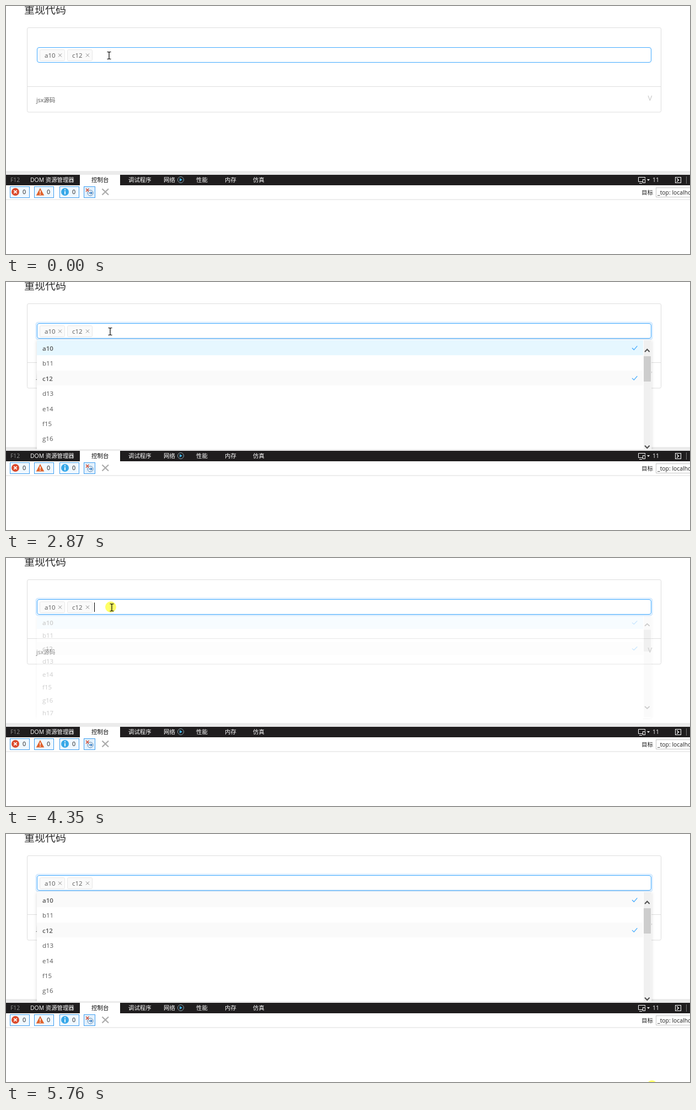
Animation of 1241x451 px, one loop 5800 ms. Source, as an HTML page:

```html
<!DOCTYPE html>
<html lang="zh">
<head>
<meta charset="utf-8">
<title>Select demo</title>
<style>
  html, body { margin: 0; width: 100%; height: 100%; overflow: hidden; background: #fff; }
  svg { display: block; }
  text { font-family: "Open Sans", "Noto Sans CJK SC", "Noto Sans CJK", sans-serif; white-space: pre; }
</style>
</head>
<body>
<svg id="stage" width="1241" height="451" viewBox="0 0 1241 451"></svg>
<script>
const LOOP = 5800;
const ROW_TOP = 106, ROW_HEIGHT = 27.43;
const ROWS = ['a10', 'b11', 'c12', 'd13', 'e14', 'f15', 'g16', 'h17'];
const SELECTED = ['a10', 'c12'];

const label = (x, y, s, size = 10.4, fill = '#fff', extra = '') =>
  `<text x="${x}" y="${y}" font-size="${size}" fill="${fill}" ${extra}>${s}</text>`;
const box = (x, y, w, h, fill, extra = '') =>
  `<rect x="${x}" y="${y}" width="${w}" height="${h}" fill="${fill}" ${extra}/>`;
const line = (d, stroke, width = 1, extra = '') =>
  `<path d="${d}" fill="none" stroke="${stroke}" stroke-width="${width}" ${extra}/>`;

const tag = (x, s) =>
  box(x + .5, 79.5, 45, 20, '#fafafa', 'stroke="#e8e8e8" rx="2"') +
  label(x + 9, 94, s, 11.5, '#595959') +
  line(`M${x + 34} 86.5l6 6m0 -6l-6 6`, '#8c8c8c');

const page = () =>
  label(33, 14.3, '重现代码', 19, '#2b2b2b') +
  box(38.5, 39.5, 1150, 153.5, '#fff', 'stroke="#dedede" rx="2.5"') +
  line('M38 146.5H1188', '#dedede') +
  label(55, 174.5, 'jsx源码', 10.5, '#595959') +
  label(1164.5, 172, 'V', 13, '#c4c4c4') +
  box(0, 300, 1241, 7, '#ebebeb') +
  box(54.5, 73.5, 1118, 31, 'none', 'id="glow" rx="4" stroke="#d1e9ff" stroke-width="2"') +
  box(56.5, 75.5, 1114, 27, '#fff', 'id="field" rx="3.5"') +
  tag(61, 'a10') + tag(111, 'c12') +
  box(160, 81, 1, 17, '#000', 'id="caret"');

const row = (name, i) => {
  const y = ROW_TOP + i * ROW_HEIGHT;
  const on = SELECTED.includes(name);
  return box(56, y, 1100, ROW_HEIGHT, '#fff', 'class="row"') +
    label(66, y + 18.8, name, 11.5, '#595959', on ? 'font-weight="600"' : '') +
    (on ? line(`M1136 ${y + 14}l3.3 3.3 6 -7`, '#40a9ff', 1.3) : '');
};

const dropdown = () =>
  `<g clip-path="url(#view)"><g id="menu">` +
  box(56, 105, 1115, 217, '#fff', 'rx="3" style="filter:drop-shadow(0 1px 3px rgba(0,0,0,.15))"') +
  ROWS.map(row).join('') +
  box(1157, 106, 13.5, 214, '#f0f0f0') + box(1157, 135, 13, 46, '#cdcdcd') +
  line('M1159 127l4.3 -4.5 4.3 4.5M1159 297.5l4.3 4.5 4.3 -4.5', '#505050', 2) +
  `</g></g>`;

const counter = (x, icon) =>
  box(x + .5, 328.5, 35, 20, '#f0f8ff', 'stroke="#3c9df0"') + icon + label(x + 23, 342, '0', 10.8, '#1e1e1e');

const devtools = () =>
  box(0, 307, 1241, 19, '#1f1d1e') + box(134, 307, 73, 19, '#fff') +
  label(8, 320, 'F12', 10.4, '#8c8c8c') + label(155, 320, '控制台', 10.5, '#000') +
  [[44, 'DOM 资源管理器'], [222, '调试程序'], [286, '网络'], [345, '性能'], [397, '内存'], [448, '仿真'], [1173, '11']]
    .map(([x, s]) => label(x, 320, s, 10.4)).join('') +
  '<circle cx="317" cy="316" r="5.5" fill="#1f1d1e" stroke="#8aa0a8"/><path d="M315 313l5 3-5 3z" fill="#3fb4f0"/>' +
  line('M1155 319.5H1147.5V311.5H1159.5V314M1149 322.5H1154', '#fff') +
  box(1155.5, 315.5, 4, 6, '#1f1d1e', 'stroke="#fff"') + '<path d="M1163 315h5l-2.5 3z" fill="#fff"/>' +
  box(1214.5, 311.5, 10, 10, 'none', 'stroke="#fff"') + line('M1217 313.5l3.5 3-3.5 3', '#fff', 1.3) +
  line('M1234.5 310V323', '#777') +
  counter(7, '<circle cx="17" cy="338" r="7" fill="#dc4a2c"/>' + line('M14.3 335.3l5.4 5.4m0 -5.4l-5.4 5.4', '#fff', 1.8)) +
  counter(51, '<path d="M62 331l7.3 13.5H54.7z" fill="#e0622c"/>' + line('M62 335.5V340M62 341.3V343', '#fff', 1.6)) +
  counter(97, '<circle cx="107" cy="338" r="7" fill="#38a8e8"/>' + line('M107 333.3V335.2M107 336.7V342.5', '#fff', 1.8)) +
  box(141.5, 328.5, 20, 20, '#e3f1fd', 'stroke="#3c9df0"') +
  '<circle cx="153" cy="340" r="5" fill="#fff" stroke="#4f7fae"/>' +
  line('M150 340h6m-2.5 -2.5l2.5 2.5 -2.5 2.5', '#2f78c0', 1.3) + line('M145 332l5.5 5.5m0 -5.5l-5.5 5.5', '#d2452d', 1.4) +
  line('M174.5 332.5l11.5 11m0 -11l-11.5 11', '#ababab', 2.2) +
  label(1153, 343, '目标', 10.5, '#1e1e1e') +
  box(1179.5, 330.5, 70, 17, '#fff', 'stroke="#c8c8c8"') + label(1182, 343, '_top: localhost', 10.4, '#1e1e1e') +
  line('M0 352H1241', '#dcdcdc');

const pointer = () =>
  '<circle id="click" r="10" fill="#ffff66"/><g id="pointer">' +
  `<g id="beam">${line('M-1.5 -5.5H1L2 -4.5 3 -5.5H5.5M2 -4.5V6.5M-1.5 7.5H1L2 6.5 3 7.5H5.5', '#000', 1.2)}</g>` +
  '<path id="arrow" d="M.5 .5V19L4.6 15.2 7.8 21.8 10.8 20.5 7.8 14.2H13.5Z" fill="#fff" stroke="#222" stroke-width="1.1"/>' +
  '<path id="hand" d="M-1.8 1.2Q-1.8 -.5 0 -.5T1.8 1.2V8Q2.2 6.5 4 6.9T5.7 8.5Q6.2 7.2 7.8 7.7T9.2 9.4Q10 8.3 11.4 9T12.3 11.5Q12.3 17 10 19.5V23.5H0V20.5Q-3.5 16.5 -6.5 12.3-7.2 9.8-4.8 10.2L-1.8 12.8Z" fill="#fff" stroke="#1b1b2b" stroke-width="1.2" stroke-linejoin="round"/></g>';

const stage = document.getElementById('stage');
stage.innerHTML = '<defs><clipPath id="view"><rect width="1241" height="304"/></clipPath></defs>' +
  box(0, 0, 1241, 451, '#fff') + page() + dropdown() + devtools() + pointer();

const $ = id => document.getElementById(id);
const rowBoxes = [...document.querySelectorAll('.row')];
const progress = (t, from, to) => Math.min(1, Math.max(0, (t - from) / (to - from)));
const mix = (a, b, k) => a + (b - a) * k;
const blend = (a, b, k) => `rgb(${a.map((v, i) => Math.round(mix(v, b[i], k)))})`;
const show = (id, visible) => $(id).setAttribute('visibility', visible ? 'visible' : 'hidden');

const BLUE = [64, 169, 255], BORDER = [217, 217, 217];
const ACTIVE = [230, 247, 255], CHOSEN = [250, 250, 250], PLAIN = [255, 255, 255];

// time, x, y, easing power
const PATH = [
  [0, 185, 89], [2840, 185, 89], [2870, 187, 89], [3150, 201, 52], [3790, 201, 52], [4020, 190, 85],
  [4110, 190, 89], [4420, 190, 89], [4710, 310, 136, 1.6], [4950, 780, 318, 1.2], [5120, 1172, 458], [LOOP, 1172, 458]
];
const CLICKS = [[500, 650], [2070, 2210], [3200, 3340], [4290, 4430], [5700, LOOP]];

function pointerAt(t) {
  const i = PATH.findIndex(p => p[0] > t);
  const [t0, x0, y0] = PATH[i - 1], [t1, x1, y1, power = 1] = PATH[i];
  const k = progress(t, t0, t1) ** power;
  return [mix(x0, x1, k), mix(y0, y1, k)];
}

function caretAt(t) {
  if (t < 930) return 0;
  if (t < 1900) return 1 - progress(t, 1340, 1520);
  if (t < 2210) return progress(t, 1900, 2080);
  if (t < 4350) return 0;
  if (t < 5240) return 1 - progress(t, 4720, 4900);
  return t < 5700 ? progress(t, 5240, 5420) : 0;
}

function menuAt(t) {
  if (t >= 3260 && t < 3510) {
    const p = progress(t, 3260, 3490) ** 5;
    return { scale: 1 - .2 * p, opacity: 1 - p ** .65 };
  }
  if (t < 915 || (t >= 3510 && t < 4335)) return { scale: .8, opacity: 0 };
  const start = t < 3260 ? 915 : 4335;
  const p = 1 - (1 - progress(t, start, start + 195)) ** 4;
  return { scale: .8 + .2 * p, opacity: p };
}

function rowFill(i, t) {
  const base = SELECTED.includes(ROWS[i]) ? CHOSEN : PLAIN;
  if (i === 0) {
    const fade = t < 4000 ? progress(t, 3250, 3430) : progress(t, 4720, 5020);
    return blend(ACTIVE, base, fade);
  }
  const enter = 4690 + 36 * i;
  const hover = .25 * progress(t, enter, enter + 50) * (1 - progress(t, enter + 50, enter + 300));
  return blend(base, ACTIVE, hover);
}

function draw(t) {
  const lit = t < 3700 ? 1 - progress(t, 3260, 3510) : progress(t, 3880, 4160);
  $('field').setAttribute('stroke', blend(BORDER, BLUE, lit));
  const glow = t < 3700 ? progress(t, 915, 1080) * (1 - progress(t, 3250, 3400)) : progress(t, 4200, 4350);
  $('glow').setAttribute('opacity', glow);
  $('caret').setAttribute('opacity', caretAt(t));

  const { scale, opacity } = menuAt(t);
  $('menu').setAttribute('transform', `translate(0 ${103 * (1 - scale)}) scale(1 ${scale})`);
  $('menu').setAttribute('opacity', opacity);
  rowBoxes.forEach((r, i) => r.setAttribute('fill', rowFill(i, t)));

  const [x, y] = pointerAt(t);
  const at = `translate(${Math.round(x)} ${Math.round(y)})`;
  $('pointer').setAttribute('transform', at);
  $('click').setAttribute('transform', at);
  const inField = y >= 75 && y < 103, inMenu = y >= 103 && y < 304;
  show('beam', inField);
  show('hand', inMenu);
  show('arrow', !inField && !inMenu);
  show('click', CLICKS.some(([from, to]) => t >= from && t < to));
}

const begin = performance.now();
function tick() {
  draw((performance.now() - begin) % LOOP);
  requestAnimationFrame(tick);
}
tick();
</script>
</body>
</html>
```
